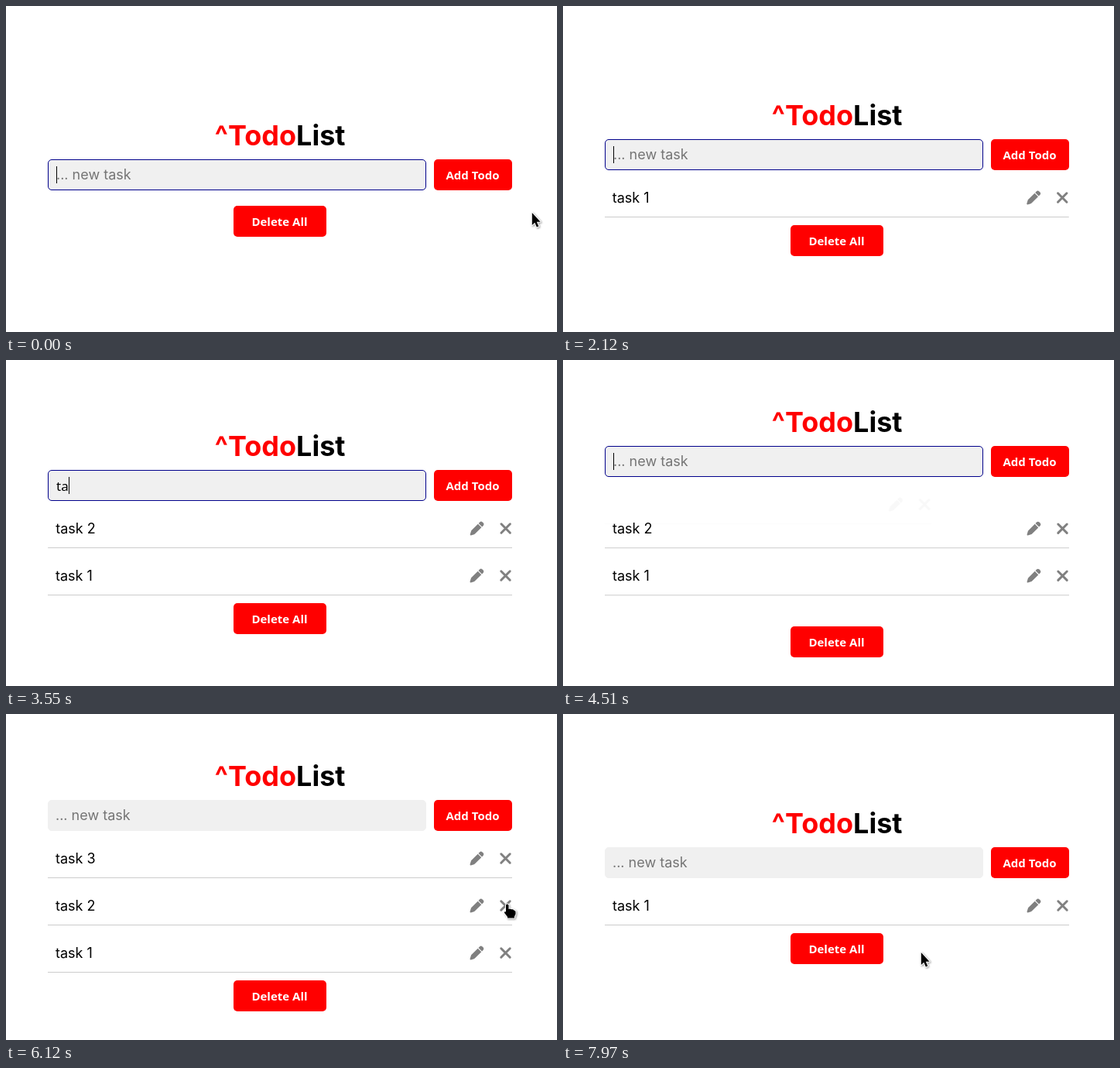
Recreate the animation shown at these times as an HTML page. Size 712x421 px, loop 8000 ms.

```html
<!DOCTYPE html>
<html lang="en">
<head>
<meta charset="utf-8">
<title>Todo list</title>
<style>
html, body { margin: 0; width: 100%; height: 100%; overflow: hidden; background: #fff; }
svg { display: block; }
text { font: 18px Inter, sans-serif; white-space: pre; }
.title { font-size: 36px; font-weight: 700; text-anchor: middle; }
.button rect { fill: #f00; }
.button text { font: 700 15px "Noto Sans", sans-serif; fill: #fff; text-anchor: middle; }
#typed { font: 17px "Noto Sans", sans-serif; }
#hint { fill: #757575; }
#cursor path { fill: #000; stroke: #fff; stroke-linejoin: round; paint-order: stroke; stroke-width: 2; }
#cursor { filter: drop-shadow(1px 1px 1px #0006); }
</style>
</head>
<body>
<svg width="712" height="421" viewBox="0 0 712 421">
  <defs>
    <clipPath id="column"><rect x="54" width="600" height="421"/></clipPath>
    <g id="icons">
      <path transform="translate(599.5 -9) scale(.035)" fill="#808080" d="M363 19L314 68 444 198 493 149Q530 104 493 59L453 19Q408-18 363 19ZM292 90L59 323Q43 339 36 361L1 481Q-3 515 31 511L151 476Q173 469 188 453L422 220Z"/>
      <path d="M639.8-5.7l11.4 11.4m0-11.4l-11.4 11.4" stroke="#808080" stroke-width="3" stroke-linecap="round"/>
    </g>
  </defs>
  <g id="head">
    <text class="title" x="354" y="-18"><tspan fill="#f00">^Todo</tspan>List</text>
    <rect id="field" x="54.5" y=".5" width="488" height="39" rx="4.5" fill="#f0f0f0"/>
    <text id="hint" y="26">... new task</text>
    <text id="typed" x="65" y="27"></text>
    <rect id="caret" y="9" width="1" height="22"/>
    <g class="button"><rect x="553" width="101" height="40" rx="5"/><text x="603" y="26">Add Todo</text></g>
  </g>
  <g id="list" clip-path="url(#column)"></g>
  <g id="clear" class="button"><rect x="294" width="120" height="40" rx="5"/><text x="353.5" y="26">Delete All</text></g>
  <g id="cursor">
    <path id="arrow" d="M.8 1V17L4.3 13.8 6.8 19.6 9.3 18.5 6.8 12.8H11.6Z"/>
    <path id="hand" d="M-2 2Q-2 .5-.3.5T1.5 2V7L3 6.4 5 7.3 7 7.2 8.3 8.5Q10.5 8.5 10.5 10.5V13.5L9 16.5V18.5H0V17L-4 11.8Q-4.3 9.8-2 10.5Z"/>
  </g>
</svg>
<script>
const LOOP = 8000, STEP = 80;
const $ = id => document.getElementById(id);
const show = (el, on) => el.setAttribute("visibility", on ? "visible" : "hidden");
const move = (el, x, y) => el.setAttribute("transform", `translate(${x} ${y})`);
const lerp = (a, b, p) => a + (b - a) * p;
const latest = (rows, t) => rows.findLastIndex(row => row[0] <= t);

// start, task numbers from the top, time already elapsed in the transition
const states = [
  [0, [], 0], [1720, [1], 40], [3080, [2, 1], 70],
  [4510, [3, 2, 1], 23], [6280, [3, 1], 40], [7490, [1], 40]
];
const typing = [[0, ""]];
const type = (text, times) => times.forEach((t, i) => typing.push([t, text.slice(0, i + 1)]));
type("task 1", [740, 990, 1240, 1320, 1400, 1560]);
typing.push([1720, ""]);
type("task 2", [2200, 2360, 2520, 2600, 2760, 2840]);
typing.push([3080, ""]);
type("task 3", [3470, 3550, 3800, 3870, 4030, 4270]);
typing.push([4510, ""]);

const caretOff = [[410, 740], [1560, 1720], [5070, LOOP]];
const pointer = [
  [0, 679, 266], [5150, 679, 266], [5230, 678, 265], [5470, 660, 252],
  [5630, 645, 239], [5870, 648, 245], [6600, 648, 245], [6840, 647, 228],
  [7080, 641, 212], [7160, 645, 213], [7490, 645, 213], [7570, 639, 216],
  [7730, 575, 250], [7890, 485, 296], [7970, 462, 307], [LOOP, 462, 307]
];

function bezier(x1, y1, x2, y2) {
  const at = (a, b, s) => 3 * a * s * (1 - s) ** 2 + 3 * b * s * s * (1 - s) + s ** 3;
  return x => {
    if (x >= 1) return 1;
    let lo = 0, hi = 1;
    for (let i = 0; i < 20; i++) {
      const mid = (lo + hi) / 2;
      if (at(x1, x2, mid) < x) lo = mid; else hi = mid;
    }
    return at(y1, y2, lo);
  };
}
const shiftEase = bezier(.4, 0, .1, 1);
const fadeEase = bezier(.25, .1, .35, 1);

// Remaining distance of a spring with stiffness 500 and damping 25
function spring(ms) {
  const s = ms / 1000, w = Math.sqrt(500 - 12.5 ** 2);
  return s > .55 ? 0 : Math.exp(-12.5 * s) * (Math.cos(w * s) + 12.5 / w * Math.sin(w * s));
}

const fieldTop = n => n ? Math.floor(203 - 30.5 * n) : 198;
const clearTop = n => n ? Math.round(252.5 + 30.5 * n) : 258;
const rowTop = (tasks, id) => fieldTop(tasks.length) + 75 + 61 * tasks.indexOf(id);

const rows = [1, 2, 3].map(id => {
  const row = document.createElementNS("http://www.w3.org/2000/svg", "g");
  row.innerHTML = `<text x="64" y="7">task ${id}</text><use href="#icons" y=".5"/>
    <rect x="54" y="25" width="600" height="1" fill="#ccc"/>`;
  return $("list").appendChild(row);
});

function drawList(t) {
  const now = latest(states, t);
  const [start, tasks, lead] = states[now];
  const before = now ? states[now - 1][1] : [];
  const age = lead + Math.floor((t - start) / STEP) * STEP;
  move($("head"), 0, fieldTop(tasks.length));
  move($("clear"), 0, clearTop(tasks.length));
  rows.forEach((row, i) => {
    const id = i + 1, listed = tasks.includes(id);
    show(row, listed);
    if (!listed) return;
    const y = rowTop(tasks, id), old = before.includes(id);
    if (old) move(row, 0, lerp(rowTop(before, id), y, shiftEase(age / 450)));
    else move(row, -200 * spring(age), y);
    row.setAttribute("opacity", old ? 1 : fadeEase(age / 300));
  });
}

function drawField(t) {
  const text = typing[latest(typing, t)][1], focus = t < 6120;
  $("typed").textContent = text;
  show($("hint"), !text);
  $("hint").setAttribute("x", focus ? 65 : 64);
  $("field").setAttribute("stroke", focus ? "#00008b" : "#f0f0f0");
  $("caret").setAttribute("x", Math.round(65 + (text ? $("typed").getComputedTextLength() : 0)));
  show($("caret"), !caretOff.some(([a, b]) => t >= a && t < b));
}

function drawCursor(t) {
  const shown = t < 740 || t >= 5230;
  const tick = Math.floor((t - 50) / STEP) * STEP + 50;
  const time = Math.max(0, tick);
  const i = Math.min(latest(pointer, time), pointer.length - 2);
  const [t0, x0, y0] = pointer[i], [t1, x1, y1] = pointer[i + 1];
  const p = (time - t0) / (t1 - t0);
  const x = lerp(x0, x1, p), hand = x > 637 && x < 655;
  move($("cursor"), Math.round(x), Math.round(lerp(y0, y1, p)));
  show($("arrow"), shown && !hand);
  show($("hand"), shown && hand);
}

const begin = performance.now();
function frame() {
  const t = (performance.now() - begin) % LOOP;
  drawList(t);
  drawField(t);
  drawCursor(t);
  requestAnimationFrame(frame);
}
frame();
</script>
</body>
</html>
```
